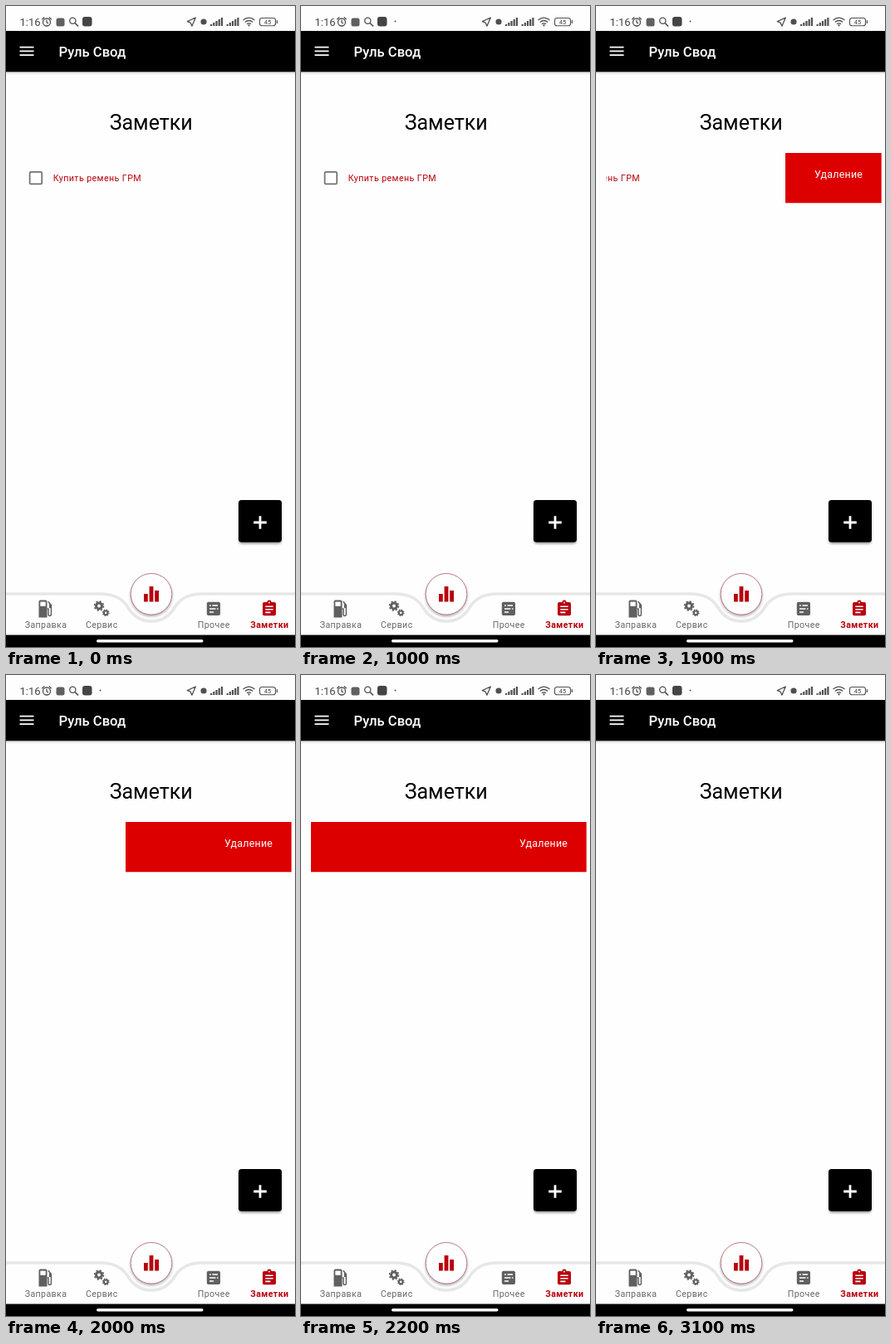
Write an HTML page that moves like this. It is 348 by 772 pixels and loops after 3800 ms.

```html
<!DOCTYPE html>
<html lang="ru">
<head>
<meta charset="utf-8">
<title>Заметки</title>
<style>
  html, body { margin: 0; width: 100%; height: 100%; overflow: hidden; background: #fefefe; }
  svg { display: block; width: 100%; height: 100%; }
  text { font-family: Roboto, "Noto Sans", sans-serif; }
  .label { font-size: 10.6px; letter-spacing: .4px; text-anchor: middle; fill: #666; }
  .active { fill: #b8000c; font-weight: 700; }
</style>
</head>
<body>
<svg viewBox="0 0 348 772" xmlns="http://www.w3.org/2000/svg">
  <defs>
    <linearGradient id="fade" x2="0" y2="1">
      <stop offset="0" stop-color="#000" stop-opacity=".16"/>
      <stop offset="1" stop-color="#000" stop-opacity="0"/>
    </linearGradient>
    <filter id="soft" x="-30%" y="-30%" width="160%" height="160%">
      <feGaussianBlur stdDeviation="1.6"/>
    </filter>
    <clipPath id="rowClip"><rect x="12.5" y="176" width="332" height="62"/></clipPath>
    <clipPath id="redClip"><rect id="reveal" x="338" y="177" width="6" height="60.5"/></clipPath>
  </defs>
  <rect width="348" height="772" fill="#fefefe"/>

  <!-- status bar -->
  <g fill="none" stroke="#505050" stroke-width="1.3">
    <text x="16.5" y="23.5" font-size="13" fill="#444" stroke="none">1:16</text>
    <circle cx="49" cy="19.5" r="4.5"/>
    <path d="M49 16.8V19.8L51 21M43.3 16.3L46.3 13.6M54.7 16.3L51.7 13.6"/>
    <rect x="60.5" y="14.5" width="10" height="10" rx="2.5" fill="#606060" stroke="none"/>
    <circle cx="80.3" cy="17.8" r="3.6"/>
    <path d="M83 20.5L87 24.5" stroke-width="1.7"/>
    <rect x="92" y="13" width="11.5" height="11.5" rx="3" fill="#444" stroke="none"/>
    <circle id="dot" cx="113.5" cy="18.5" r="1" fill="#555" stroke="none"/>
    <path d="M218.3 18.6L228.3 14L223.9 24.2L222.2 20.2Z" stroke-linejoin="round"/>
    <circle cx="238" cy="19" r="3.6" fill="#505050" stroke="none"/>
    <g id="signal" stroke="none" fill="#505050"></g>
    <path d="M285.5 17Q292.5 11.2 299.5 17M287.8 19.4Q292.5 15.6 297.2 19.4M290 21.8Q292.5 19.8 295 21.8"/>
    <circle cx="292.5" cy="23.4" r="1.1" fill="#505050" stroke="none"/>
    <rect x="305.5" y="14.5" width="19" height="9.2" rx="2.8" stroke-width="1.1"/>
    <path d="M326.4 17.2V21"/>
    <text x="315" y="22" font-size="7.5" text-anchor="middle" fill="#444" stroke="none">45</text>
  </g>

  <!-- app bar -->
  <rect y="79" width="348" height="4" fill="url(#fade)"/>
  <rect y="30" width="348" height="49.3"/>
  <path d="M16.5 49.6H33.5M16.5 54.4H33.5M16.5 59.2H33.5" stroke="#fff" stroke-width="1.8"/>
  <text x="63.5" y="61.3" font-size="16.6" font-weight="500" fill="#fff">Руль Свод</text>

  <text x="174.7" y="149.3" font-size="25" text-anchor="middle">Заметки</text>

  <!-- note row -->
  <g id="row">
    <g id="under" clip-path="url(#redClip)">
      <rect x="12" y="177" width="331.7" height="60.5" fill="#dc0000"/>
      <text x="263" y="207.3" font-size="12.4" letter-spacing=".25" fill="#fff">Удаление</text>
    </g>
    <g clip-path="url(#rowClip)">
      <g id="note">
        <rect x="28.6" y="199.8" width="14.6" height="14.6" rx="1.4" fill="none" stroke="#707070" stroke-width="1.7"/>
        <text x="56.7" y="211.4" font-size="10.7" letter-spacing=".4" fill="#b8000c">Купить ремень ГРМ</text>
      </g>
    </g>
  </g>

  <!-- add button -->
  <rect x="280.5" y="597.5" width="51" height="50" rx="4" opacity=".45" filter="url(#soft)"/>
  <rect x="280" y="595" width="52" height="50.8" rx="3.5"/>
  <path d="M298.2 622H313.8M306 614.2V629.8" stroke="#fff" stroke-width="2.8"/>

  <!-- bottom bar -->
  <path d="M-5 708H114C130 708 140 714 146 723C153 735 163 741 175 741S197 735 204 723C210 714 220 708 236 708H353V770H-5Z"
        fill="#fefefe" stroke="#e7e7e7" stroke-width="3.6"/>
  <circle cx="175" cy="710" r="25.5" opacity=".28" filter="url(#soft)"/>
  <circle cx="175" cy="708.3" r="24.8" fill="#fefefe" stroke="#b0606c" stroke-width=".8"/>
  <path d="M166 708H170.8V717.5H166ZM172.6 699H177.4V717.5H172.6ZM179.2 704H184V717.5H179.2Z" fill="#b8000c"/>

  <g fill="#606060">
    <path d="M39.5 717.5Q39.5 715.5 41.5 715.5H47.5Q49.5 715.5 49.5 717.5V736.5H39.5Z"/>
    <rect x="41.3" y="717.6" width="6.4" height="5.2" fill="#fefefe"/>
    <path d="M49.5 726H51V732.5Q51 734.5 52.7 734.5T54.4 732.5V721.5L50.8 717.2" fill="none" stroke="#606060" stroke-width="1.5"/>
    <path d="M52 719.5L55 722.5V725H52Z"/>
    <g id="gears" fill="none" stroke="#606060"></g>
    <rect x="241.8" y="717.8" width="16.2" height="16.2" rx="2"/>
    <path d="M248.5 722H255M245 726H252.5M245 730H250" stroke="#fefefe" stroke-width="1.7"/>
    <path d="M245 722H246.8M254 726H255.5" stroke="#fefefe" stroke-width="1.7"/>
  </g>
  <g fill="#b8000c">
    <rect x="309" y="718" width="16" height="16.3" rx="2"/>
    <circle cx="317" cy="718.2" r="2.6"/>
    <circle cx="317" cy="718.5" r=".9" fill="#fefefe"/>
    <path d="M312.3 723.2H321.7M312.3 726.8H321.7M312.3 730.4H318.5" stroke="#fefefe" stroke-width="1.6"/>
  </g>
  <text class="label" x="48" y="749">Заправка</text>
  <text class="label" x="115.3" y="749">Сервис</text>
  <text class="label" x="250.2" y="749">Прочее</text>
  <text class="label active" x="317.4" y="749">Заметки</text>

  <rect y="757.5" width="348" height="15"/>
  <rect x="109" y="763" width="128.5" height="3.4" rx="1.7" fill="#fff"/>
</svg>
<script>
  const LOOP = 3800, DOT_AT = 800, SWIPE_AT = 1800, GONE_AT = 2400, STEP = 100;
  const SLIDE = [35, 110, 194, 274, 326];
  const EDGE = 338, RIGHT = 344;
  const $ = id => document.getElementById(id);
  const show = (el, on) => el.setAttribute('visibility', on ? 'visible' : 'hidden');

  function bars(x) {
    return [2, 4, 6, 8, 10].map((h, i) =>
      `<rect x="${x + i * 3.2}" y="${24 - h}" width="2.2" height="${h}"/>`).join('');
  }

  function gear(x, y, r) {
    const tooth = 2 * Math.PI * r * 1.3 / 16;
    return `<circle cx="${x}" cy="${y}" r="${r * .82}" stroke-width="${r * .72}"/>` +
      `<circle cx="${x}" cy="${y}" r="${r * 1.3}" stroke-width="${r * .4}" stroke-dasharray="${tooth}"/>`;
  }

  $('signal').innerHTML = bars(246) + bars(265.5);
  $('gears').innerHTML = gear(112, 722.5, 4.2) + gear(120.2, 730.8, 2.9);

  function draw(t) {
    const i = Math.floor((t - SWIPE_AT) / STEP);
    const shift = i < 0 ? 0 : SLIDE[Math.min(i, SLIDE.length - 1)];
    show($('dot'), t >= DOT_AT);
    $('row').style.display = t < GONE_AT ? '' : 'none';
    show($('under'), shift > 0);
    $('note').setAttribute('transform', `translate(${-shift} 0)`);
    $('reveal').setAttribute('x', EDGE - shift);
    $('reveal').setAttribute('width', RIGHT - EDGE + shift);
  }

  function tick() {
    draw(performance.now() % LOOP);
    requestAnimationFrame(tick);
  }
  tick();
</script>
</body>
</html>
```
